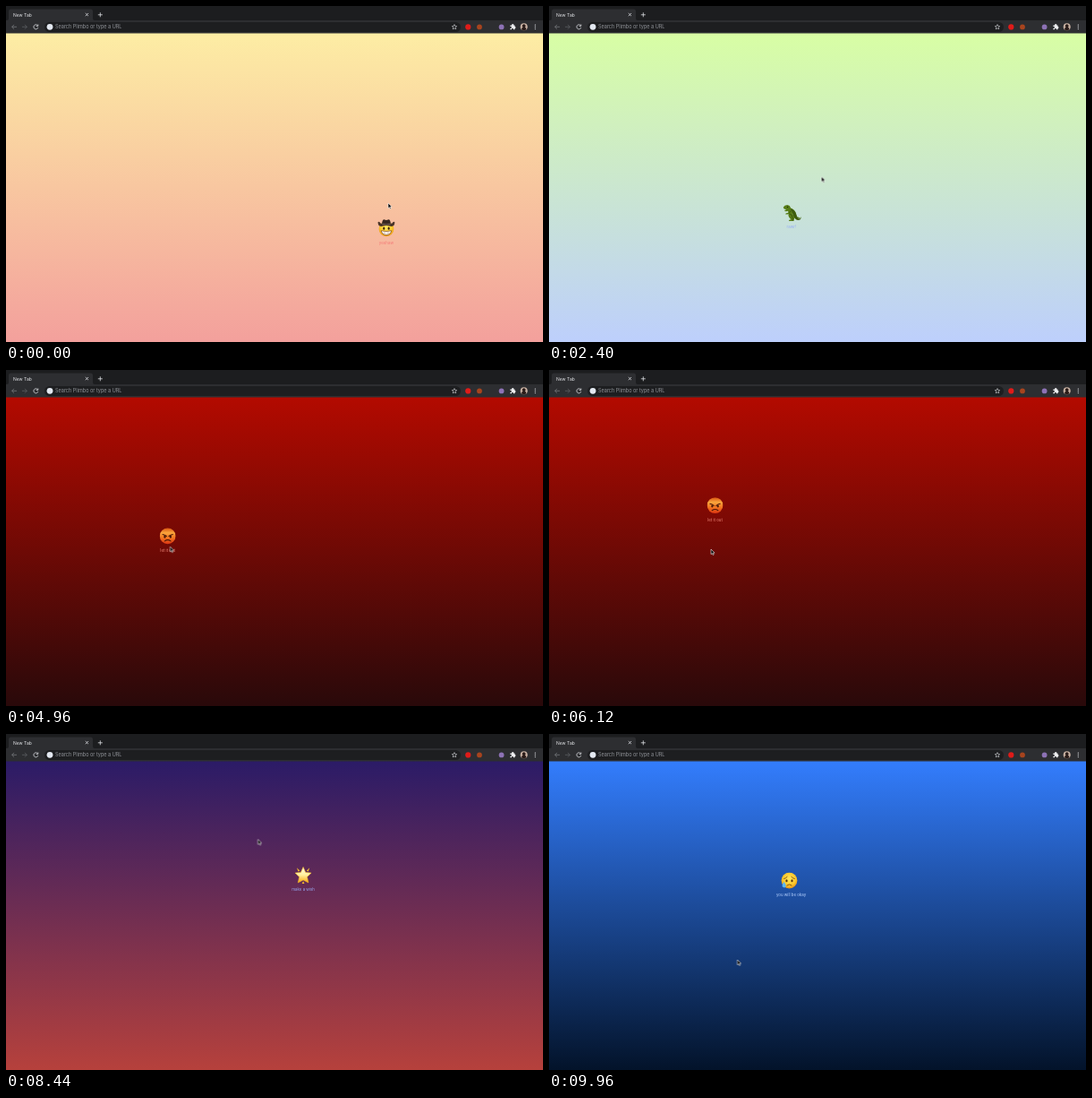
An HTML page for the animation above (10 s loop, 600x375 px).

```html
<!DOCTYPE html>
<html lang="en">
<head>
<meta charset="utf-8">
<title>New Tab</title>
<style>
html, body { margin: 0; width: 100%; height: 100%; overflow: hidden; background: #1c1d1f; }
svg { display: block; width: 100vw; height: 100vh; }
text { font-family: Inter, Roboto, sans-serif; }
.caption { font-size: 4.4px; text-anchor: middle; }

/* Each scene covers the one before it */
.scene { animation: 10s step-end infinite; }
#dino { animation-name: show1; }
#pumpkin { animation-name: show2; }
#angry { animation-name: show3; }
#star { animation-name: show4; }
#sad { animation-name: show5; }
@keyframes show1 { 0% { visibility: hidden } 5.6%, 100% { visibility: visible } }
@keyframes show2 { 0% { visibility: hidden } 27.2%, 100% { visibility: visible } }
@keyframes show3 { 0% { visibility: hidden } 48%, 100% { visibility: visible } }
@keyframes show4 { 0% { visibility: hidden } 71.6%, 100% { visibility: visible } }
@keyframes show5 { 0% { visibility: hidden } 88%, 100% { visibility: visible } }

.float { animation: drift 10s linear infinite; }
@keyframes drift {
  0% { transform: translate(425px, 248px) }
  5.6% { transform: translate(398px, 226px) }
  24% { transform: translate(271px, 231px) }
  27.2% { transform: translate(249px, 232px) }
  42% { transform: translate(200px, 202px) }
  48% { transform: translate(180px, 190px) }
  61.2% { transform: translate(185.5px, 151px) }
  71.6% { transform: translate(226px, 279px) }
  73.2% { transform: translate(239px, 264px) }
  84.4% { transform: translate(332px, 158px) }
  88% { transform: translate(362px, 124px) }
  99.6%, 100% { transform: translate(268.5px, 163.5px) }
}

#cursor { animation: point 10s ease-in-out infinite; }
@keyframes point {
  0% { transform: translate(427px, 220px) }
  5.6% { transform: translate(399px, 225px) }
  14% { transform: translate(372px, 258px) }
  24% { transform: translate(304.5px, 190.5px) }
  27.2% { transform: translate(251px, 230px) }
  42% { transform: translate(169.5px, 261px) }
  48% { transform: translate(180px, 190px) }
  54% { transform: translate(203px, 238px) }
  61.2% { transform: translate(181px, 200px) }
  71.6% { transform: translate(225px, 275px) }
  73.2% { transform: translate(231.5px, 257px) }
  84.4% { transform: translate(281.5px, 117.5px) }
  88% { transform: translate(361px, 123px) }
  94% { transform: translate(250px, 290px) }
  99.6%, 100% { transform: translate(210.5px, 252px) }
}
</style>
</head>
<body>
<svg viewBox="0 0 600 375" preserveAspectRatio="none">
  <defs>
    <linearGradient id="bg0" x2="0" y2="1"><stop stop-color="#fdeda4"/><stop offset="1" stop-color="#f3a09c"/></linearGradient>
    <linearGradient id="bg1" x2="0" y2="1"><stop stop-color="#d8fea4"/><stop offset="1" stop-color="#bdcffc"/></linearGradient>
    <linearGradient id="bg2" x2="0" y2="1"><stop stop-color="#1f1202"/><stop offset="1" stop-color="#984100"/></linearGradient>
    <linearGradient id="bg3" x2="0" y2="1"><stop stop-color="#b30a00"/><stop offset="1" stop-color="#29090a"/></linearGradient>
    <linearGradient id="bg4" x2="0" y2="1"><stop stop-color="#2b1b67"/><stop offset="1" stop-color="#b6413c"/></linearGradient>
    <linearGradient id="bg5" x2="0" y2="1"><stop stop-color="#337dfd"/><stop offset="1" stop-color="#03132a"/></linearGradient>
    <radialGradient id="face" cy=".4" r=".62"><stop stop-color="#ffe75c"/><stop offset=".65" stop-color="#fcc72c"/><stop offset="1" stop-color="#e58e12"/></radialGradient>
    <linearGradient id="rage" x2="0" y2="1"><stop stop-color="#d9520f"/><stop offset=".3" stop-color="#f9a53c"/><stop offset=".65" stop-color="#f1701e"/><stop offset="1" stop-color="#dc3512"/></linearGradient>
    <radialGradient id="gourd"><stop stop-color="#ff9d26"/><stop offset="1" stop-color="#e25a0c"/></radialGradient>
    <linearGradient id="gold" x2="0" y2="1"><stop stop-color="#fffbe0"/><stop offset=".5" stop-color="#fff0a0"/><stop offset="1" stop-color="#f7a70d"/></linearGradient>
  </defs>

  <g class="scene">
    <rect y="30" width="600" height="345" fill="url(#bg0)"/>
    <g class="float">
      <circle cy="1" r="8.3" fill="url(#face)"/>
      <path d="M-9.4-6.6Q-8.2-8.4-6.4-5.4Q0-3.4 6.4-5.4Q8.2-8.4 9.4-6.6Q9.4-1.8 5.6-2Q0-4-5.6-2Q-9.4-1.8-9.4-6.6Z" fill="#493328"/>
      <path d="M-5-4.2Q-4.6-9.6-2.4-9.6Q0-8.4 2.4-9.6Q4.6-9.6 5-4.2Q0-3-5-4.2Z" fill="#382821"/>
      <path d="M-4.7-4.7Q0-3.4 4.7-4.7" fill="none" stroke="#77665c"/>
      <g fill="#37200e"><ellipse cx="-2.7" cy=".2" rx="1" ry="1.7"/><ellipse cx="2.7" cy=".2" rx="1" ry="1.7"/></g>
      <path d="M-5.8 2.8Q0 4.4 5.8 2.8Q4.6 7.6 0 7.6T-5.8 2.8Z" fill="#fff" stroke="#794018" stroke-width=".7"/>
      <path d="M-4.8 5.1Q0 6.2 4.8 5.1M-2 3.6V7M2 3.6V7" fill="none" stroke="#b68a60" stroke-width=".35"/>
      <text class="caption" y="17.6" fill="#f57b78">yeehaw</text>
    </g>
  </g>

  <g class="scene" id="dino">
    <rect y="30" width="600" height="345" fill="url(#bg1)"/>
    <g class="float">
      <path d="M-9.2-6.2Q-8-8.8-4.6-8.9Q-1.5-8.4-.8-5.5Q3.5-4 5 0Q5.8 4.8 8 6.2Q9.8 6.6 10.6 4.2Q11.2 8-.0 0Q10.5 8.4 7.4 8Q4.8 7.4 3.4 5.4L2.4 9H-3L-2.5 7.7L-.5 7.2Q-4 4.5-3.4 1Q-5.4 2-6.8 1.2L-6 .3L-3.6-.3L-3.8-2.2Q-6.6-1.2-8-2.6L-5.7-4Q-8.8-3.8-9.2-6.2Z" fill="#577c16"/>
      <path d="M-1-5Q3.5-3.8 4.7.2T8 6.4Q10 7 10.6 4.2Q10.8 8.2 7.6 8Q4.6 7.5 3 4.5Z" fill="#3d5c0e"/>
      <path d="M-2.5 1Q1 1.4.8 4.5L2 8.6M-.4-2.8L-2.8.2" fill="none" stroke="#344d0c" stroke-width=".7"/>
      <circle cx="-4.4" cy="-6.6" r=".65" fill="#1e2b08"/>
      <text class="caption" y="17.4" fill="#98aef4">rawr!</text>
    </g>
  </g>

  <g class="scene" id="pumpkin">
    <rect y="30" width="600" height="345" fill="url(#bg2)"/>
    <g class="float">
      <path d="M-2.1-5.4Q-.2-6.6-1-8.8L1.5-9.2Q1-7 2.4-5.4Z" fill="#59803b"/>
      <ellipse cy="1.1" rx="9" ry="7.4" fill="url(#gourd)"/>
      <g fill="none" stroke="#bf4708" stroke-width=".55"><ellipse cy="1.1" rx="6.3" ry="7.2"/><ellipse cy="1.1" rx="2.8" ry="7.2"/></g>
      <path d="M-5.4-.4L-3.3-4L-1.3-.6ZM5.4-.4L3.3-4L1.3-.6ZM-1 1.8L0 .2L1 1.8ZM-6.4 1.8L-4.2 3L-2.6 2.8L-1.4 4.2H1.4L2.6 2.8L4.2 3L6.4 1.8Q4.8 6.8 1.4 6.9L.8 5.7H-.8L-1.4 6.9Q-4.8 6.8-6.4 1.8Z" fill="#ffee58" stroke="#a63c08" stroke-width=".4"/>
      <text class="caption" y="17.5" fill="#ffc49a">spooky</text>
    </g>
  </g>

  <g class="scene" id="angry">
    <rect y="30" width="600" height="345" fill="url(#bg3)"/>
    <g class="float">
      <circle r="8.9" fill="url(#rage)"/>
      <g fill="#481708"><ellipse cx="-3.2" cy="1" rx="1.1" ry="1.4"/><ellipse cx="3.2" cy="1" rx="1.1" ry="1.4"/></g>
      <path d="M-5.6-1.8Q-3.5-1.4-1.2.3M5.6-1.8Q3.5-1.4 1.2.3M-3.3 5.6Q0 3.2 3.3 5.6" fill="none" stroke="#481708" stroke-width="1.1" stroke-linecap="round"/>
      <text class="caption" y="17.4" fill="#ee8577">let it out</text>
    </g>
  </g>

  <g class="scene" id="star">
    <rect y="30" width="600" height="345" fill="url(#bg4)"/>
    <g class="float">
      <path d="M0-9.4L2.7-3.4L9-2.8L4.4 1.6L5.8 8L0 5L-5.8 8L-4.4 1.6L-9-2.8L-2.7-3.4Z" fill="url(#gold)" stroke="#f8bd2b" stroke-width=".6" stroke-linejoin="round"/>
      <path d="M-7.2-8.7L-3.8-5.5L-5.6-4.5ZM7.2-8.7L3.8-5.5L5.6-4.5ZM-1.4 9.2L0 6.3L1.4 9.2Z" fill="#f6be2e"/>
      <text class="caption" y="17.4" fill="#96a4ed">make a wish</text>
    </g>
  </g>

  <g class="scene" id="sad">
    <rect y="30" width="600" height="345" fill="url(#bg5)"/>
    <g class="float">
      <circle r="8.9" fill="url(#face)"/>
      <g fill="#55300d"><ellipse cx="-3" cy=".3" rx="1.1" ry="1.5"/><ellipse cx="3" cy=".3" rx="1.1" ry="1.5"/></g>
      <path d="M-5.8-2Q-3.8-2.4-2.4-4.1M5.8-2Q3.8-2.4 2.4-4.1M-2.6 5.4Q0 3.2 2.6 5.4" fill="none" stroke="#764713" stroke-width=".9" stroke-linecap="round"/>
      <path d="M-6 1.4Q-3 5.2-4 7Q-5.6 8.8-7.6 7.1Q-8.6 5.3-6 1.4Z" fill="#5bb7f3"/>
      <text class="caption" x="2" y="17.3" fill="#b5d1ff">you will be okay</text>
    </g>
  </g>

  <g id="browser">
    <rect width="600" height="17" fill="#1c1d1f"/>
    <path d="M0 16H1Q3 16 3 14V6Q3 3.5 5.5 3.5H94.5Q97 3.5 97 6V14Q97 16 99 16H600V30.5H0Z" fill="#2d2e31"/>
    <rect x="43" y="18" width="465" height="11" rx="5.5" fill="#1d1e20"/>
    <text x="8" y="11.6" font-size="5" fill="#e4e6e9">New Tab</text>
    <text x="55" y="25.4" font-size="5.5" fill="#92959a">Search Plimbo or type a URL</text>
    <g fill="none" stroke="#dfe1e5" stroke-width=".8">
      <path d="M88.8 8L92 11.2M92 8L88.8 11.2M102.8 9.8H107.8M105.3 7.3V12.3"/>
      <path d="M12 23.3H6.6M9 20.9L6.6 23.3L9 25.7" stroke="#77797d"/>
      <path d="M18 23.3H23.4M21 20.9L23.4 23.3L21 25.7" stroke="#5c5e62"/>
      <path d="M35.3 21.7A2.5 2.5 0 1 0 35.8 24.1M35.8 20.5V22.4H33.8"/>
      <path d="M501 20.6L501.8 22.4L503.7 22.6L502.3 23.9L502.7 25.8L501 24.8L499.3 25.8L499.7 23.9L498.3 22.6L500.2 22.4Z" stroke-width=".6"/>
    </g>
    <circle cx="49" cy="23.3" r="3.4" fill="#e3e8f0"/>
    <circle cx="516.3" cy="23.4" r="3.1" fill="#e01b19"/>
    <circle cx="529" cy="23.4" r="2.9" fill="#a7441e"/>
    <circle cx="553.6" cy="23.4" r="2.9" fill="#8d72b5"/>
    <path d="M563.4 21.6H565.2A1.1 1.1 0 1 1 567.2 21.6H568.5V23A1 1 0 1 1 568.5 25V26.2H566.9A1 1 0 1 0 565 26.2H563.4V24.7A1 1 0 1 0 563.4 22.9Z" fill="#f1f2f4"/>
    <circle cx="578.7" cy="23.3" r="4" fill="#c9b2a3"/>
    <path d="M576 26.2Q576.1 24.2 577.6 23.8A1.9 1.9 0 1 1 579.8 23.8Q581.3 24.2 581.4 26.2Q578.7 28.3 576 26.2Z" fill="#2a1c19"/>
    <g fill="#dfe1e5"><circle cx="591.3" cy="21.2" r=".65"/><circle cx="591.3" cy="23.4" r=".65"/><circle cx="591.3" cy="25.6" r=".65"/></g>
  </g>

  <g id="cursor">
    <path d="M0 0V5.7L1.3 4.5L2.2 6.5L3.2 6.1L2.4 4.1H4.1Z" fill="#080808" stroke="#fff" stroke-width=".55" stroke-linejoin="round"/>
  </g>
</svg>
</body>
</html>
```
